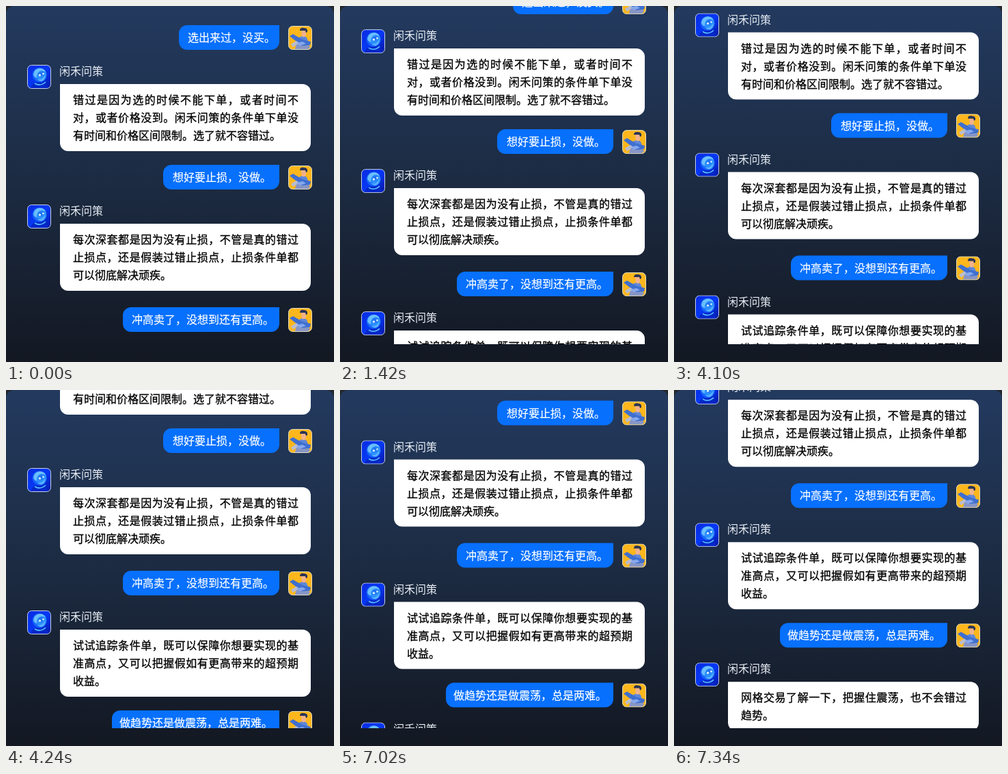
An HTML page for the animation above (8 s loop, 480 by 520 pixels).

```html
<!DOCTYPE html>
<html lang="zh-CN">
<head>
<meta charset="utf-8">
<title>Chat</title>
<style>
  html, body { margin: 0; width: 100%; height: 100%; overflow: hidden; background: #23262b; }
  .stage {
    position: relative; width: 480px; height: 520px; overflow: hidden;
    border-radius: 12px 12px 0 0;
    background: linear-gradient(#233a5f, #1c2b42 50%, #131822);
    font: 500 16px/26px "Noto Sans CJK SC", "Noto Sans CJK", "Noto Sans CJK JP", sans-serif;
  }
  .view { position: absolute; inset: 0 0 26px; overflow: hidden; }
  .list, .msg { position: absolute; left: 0; top: 0; width: 480px; }
  .msg > * { position: absolute; box-sizing: border-box; margin: 0; }
  .msg svg { width: 35px; height: 35px; }
  .bot svg { left: 31px; top: 0; }
  .bot b { left: 78px; top: -5px; font-weight: 400; color: #e8edf4; white-space: nowrap; }
  .bot p {
    left: 79px; top: 28px; width: 367px; padding: 9px 18px 11px 19px;
    border-radius: 0 12px 12px 12px; background: #fff; color: #000;
    text-align: justify; -webkit-text-stroke: .3px;
  }
  .user svg { left: 413px; top: 1px; }
  .user p {
    right: 80px; top: 0; height: 36px; line-height: 34px;
    border-radius: 12px 0 12px 12px; background: #0770fd; color: #fff;
    white-space: nowrap; -webkit-text-stroke: .2px;
  }
</style>
</head>
<body>
<svg width="0" height="0" style="position:absolute">
  <defs>
    <linearGradient id="sky" x2="1" y2="1">
      <stop stop-color="#0a2be0"/><stop offset=".5" stop-color="#0638f5"/><stop offset="1" stop-color="#0216a0"/>
    </linearGradient>
    <radialGradient id="orb" cx=".6" cy=".4" r=".65">
      <stop stop-color="#1d6cf0"/><stop offset=".5" stop-color="#2f95ff"/><stop offset="1" stop-color="#0a4cf5"/>
    </radialGradient>
    <clipPath id="tile"><rect x=".5" y=".5" width="34" height="34" rx="6"/></clipPath>
  </defs>
  <symbol id="bot" viewBox="0 0 35 35">
    <g clip-path="url(#tile)">
      <rect width="35" height="35" fill="url(#sky)"/>
      <path d="M5 35q1-9 9-9h8q8 0 9 9z" fill="#0627c8"/>
      <path d="M11 27q8 5 16-2" fill="none" stroke="#58c4ff" stroke-width="1.6"/>
      <circle cx="18" cy="15" r="10.5" fill="url(#orb)"/>
      <path d="M9 14q1-8 9-9 7 0 9 5-6-3-10 0-4 4-3 9-4-1-5-5z" fill="#7fd0ff" opacity=".75"/>
      <path d="M15 21q8 2 11-6 1 7-5 9-4 0-6-3z" fill="#68c2ff" opacity=".8"/>
      <circle cx="18.500" cy="15" r="1.6" fill="#e4f7ff"/><circle cx="23.500" cy="13" r="1.3" fill="#e4f7ff"/>
    </g>
    <rect x=".5" y=".5" width="34" height="34" rx="6" fill="none" stroke="#c5d2ec"/>
  </symbol>
  <symbol id="user" viewBox="0 0 35 35">
    <g clip-path="url(#tile)">
      <rect width="35" height="35" fill="#fdb71c"/>
      <path d="M10 34l2-8 16-1 4 6-3 3z" fill="#8796c6"/>
      <path d="M16 17q6-4 11 0l3 8-13 2z" fill="#5f87d8"/>
      <path d="M19 7h7v7q-3 4-6 1z" fill="#f3b28b"/>
      <path d="M17 7q0-5 6-4 6 0 5 6l-2 1-1-3z" fill="#2b3555"/>
      <path d="M2 15l5-3 14 8 12 3-1 5-12 1z" fill="#3f6fd0"/>
      <path d="M4 27l8-5 4 3-9 6z" fill="#b9bdd0"/>
      <path d="M12 25l9-2 5 3-9 3z" fill="#86a8ec"/>
    </g>
    <rect x=".5" y=".5" width="34" height="34" rx="6" fill="none" stroke="#e2dcc5"/>
  </symbol>
</svg>
<div class="stage"><div class="view"><div class="list" id="list"></div></div></div>
<script>
  const NAME = '闲禾问策';
  const list = document.getElementById('list');

  function add(kind, y, body) {
    list.insertAdjacentHTML('beforeend',
      `<div class="msg ${kind}" style="top:${y}px">${body}<svg><use href="#${kind}"/></svg></div>`);
  }
  const bot = (y, text) => add('bot', y, `<b>${NAME}</b><p>${text}</p>`);
  const user = (y, width, indent, text) =>
    add('user', y, `<p style="width:${width}px;padding-left:${indent}px">${text}</p>`);

  user(28, 147, 13, '选出来过，没买。');
  bot(86, `错过是因为选的时候不能下单，或者时间不对，或者价格没到。${NAME}的条件单下单没有时间和价格区间限制。选了就不容错过。`);
  user(232, 170, 14, '想好要止损，没做。');
  bot(290, '每次深套都是因为没有止损，不管是真的错过止损点，还是假装过错止损点，止损条件单都可以彻底解决顽疾。');
  user(440, 229, 13, '冲高卖了，没想到还有更高。');
  bot(498, '试试追踪条件单，既可以保障你想要实现的基准高点，又可以把握假如有更高带来的超预期收益。');
  user(644, 245, 11, '做趋势还是做震荡，总是两难。');
  bot(702, '网格交易了解一下，把握住震荡，也不会错过趋势。');

  const LOOP = 8000, STEP = 20, SLIDE = 360;
  const slides = [{ at: 1260, by: 70 }, { at: 4080, by: 143 }, { at: 7000, by: 91 }];

  // cubic-bezier(.25, .1, .25, 1), solved for x by bisection
  function ease(x) {
    if (x <= 0 || x >= 1) return x <= 0 ? 0 : 1;
    const curve = (a, b, t) => 3 * a * t * (1 - t) ** 2 + 3 * b * t * t * (1 - t) + t ** 3;
    let lo = 0, hi = 1;
    for (let i = 0; i < 24; i++) {
      const mid = (lo + hi) / 2;
      if (curve(.25, .25, mid) < x) lo = mid; else hi = mid;
    }
    return curve(.1, 1, lo);
  }

  const start = performance.now();
  function draw(now) {
    const time = Math.max(0, now - start) % LOOP;
    const t = Math.floor(time / STEP) * STEP;
    const y = slides.reduce((sum, s) => sum + s.by * ease((t - s.at) / SLIDE), 0);
    list.style.transform = `translateY(${-y.toFixed(2)}px)`;
    requestAnimationFrame(draw);
  }
  draw(start);
</script>
</body>
</html>
```
